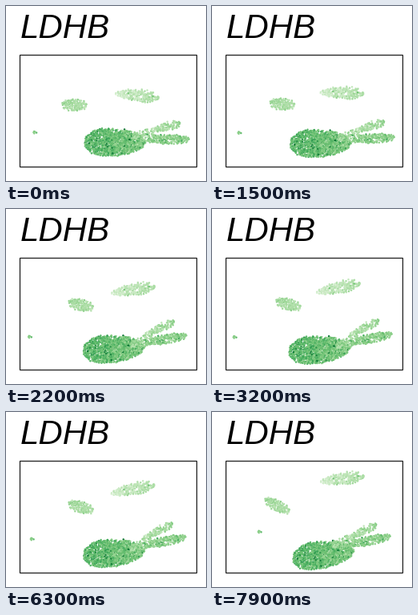
A matplotlib script for the animation above (8000 ms loop, 250 by 219 pixels).

```python
import numpy as np
import matplotlib.pyplot as plt
from matplotlib.animation import FuncAnimation
from matplotlib.patches import Rectangle

W, H, DPI = 250, 219, 64
PT = 72 / DPI  # points per pixel
STEPS = 28
rng = np.random.default_rng(7)


def ease(p):
    """Cubic in-out."""
    p = min(max(p, 0), 1)
    return 4 * p**3 if p < 0.5 else 1 - 4 * (1 - p) ** 3


def blob(rx, ry, tone, density, taper, *poses):
    """Egg-shaped cloud; each pose (x, y, slope) moves and shears it.

    Positive taper thins the right end; the fat end is a little darker.
    """
    a, b = rng.uniform(-1, 1, (2, int(4 * rx * ry * density)))
    inside = np.abs(b) < (1 - a * a) ** 0.45
    a, b = a[inside], b[inside]
    dx = rx * a + rng.normal(0, 0.6, a.size)
    dy = ry * b * (1 - taper * a) + rng.normal(0, 0.6, a.size)
    points = [np.column_stack([x + dx, y + dy + slope * dx]) for x, y, slope in poses]

    values = tone - 0.2 * taper * a + rng.normal(0, 0.14 * tone, a.size)
    values += (rng.random(a.size) < 0.05) * rng.uniform(0, 0.7 * tone, a.size)
    return np.array(points), np.clip(values, 0.14, 0.95)


main = blob(38, 16.5, 0.52, 0.65, 0.2, (136, 170.5, 0), (134, 176, -0.06), (139, 178.5, -0.12))
bridge = blob(15, 8, 0.38, 0.25, 0, (173, 162, 0), (170, 167, -0.3), (165, 163, -0.2))
lower_arm = blob(26, 5.5, 0.44, 0.5, 0, (203, 167, 0), (199, 162, -0.2), (197, 161, -0.2))
upper_arm = blob(20, 5, 0.35, 0.34, -0.2, (201, 151, -0.2), (192, 148, -0.45), (189, 149, -0.42))
left_island = blob(16, 6.5, 0.34, 0.42, 0.2, (86, 124, 0), (96, 119.5, 0.2), (82, 117.5, 0.4))
top_island = blob(27, 7, 0.27, 0.4, -0.3, (164, 112, 0.1), (158, 98.5, -0.2), (163, 83.5, -0.12))
speck = blob(1.6, 0.8, 0.46, 1, 0, (36, 158.3, 0), (28.3, 160.5, 0), (59.5, 150, 0))

groups = [main, bridge, lower_arm, upper_arm, left_island, top_island, speck]
poses = np.concatenate([points for points, _ in groups], axis=1)
values = np.concatenate([tones for _, tones in groups])

fig = plt.figure(figsize=(W / DPI, H / DPI), dpi=DPI, facecolor="white")
ax = fig.add_axes([0, 0, 1, 1])
ax.set(xlim=(0, W), ylim=(H, 0))
ax.axis("off")
ax.text(17.4, 40, "LDHB", family="Liberation Sans", style="italic", size=42 * PT)
dots = ax.scatter(*poses[0].T, c=plt.get_cmap("Greens")(values),
                  s=(2.5 * PT) ** 2, linewidths=0)
ax.add_patch(Rectangle((17, 61), 221, 140, fill=False, ec="#222222",
                       lw=1.3 * PT, zorder=3))


def draw(frame):
    first, second = ease((frame - 4) / STEPS), ease((frame - 54) / STEPS)
    start, middle, end = poses
    dots.set_offsets(start + (middle - start) * first + (end - middle) * second)
    return (dots,)


anim = FuncAnimation(fig, draw, frames=80, interval=100, repeat=True, repeat_delay=0)
plt.show()
```
